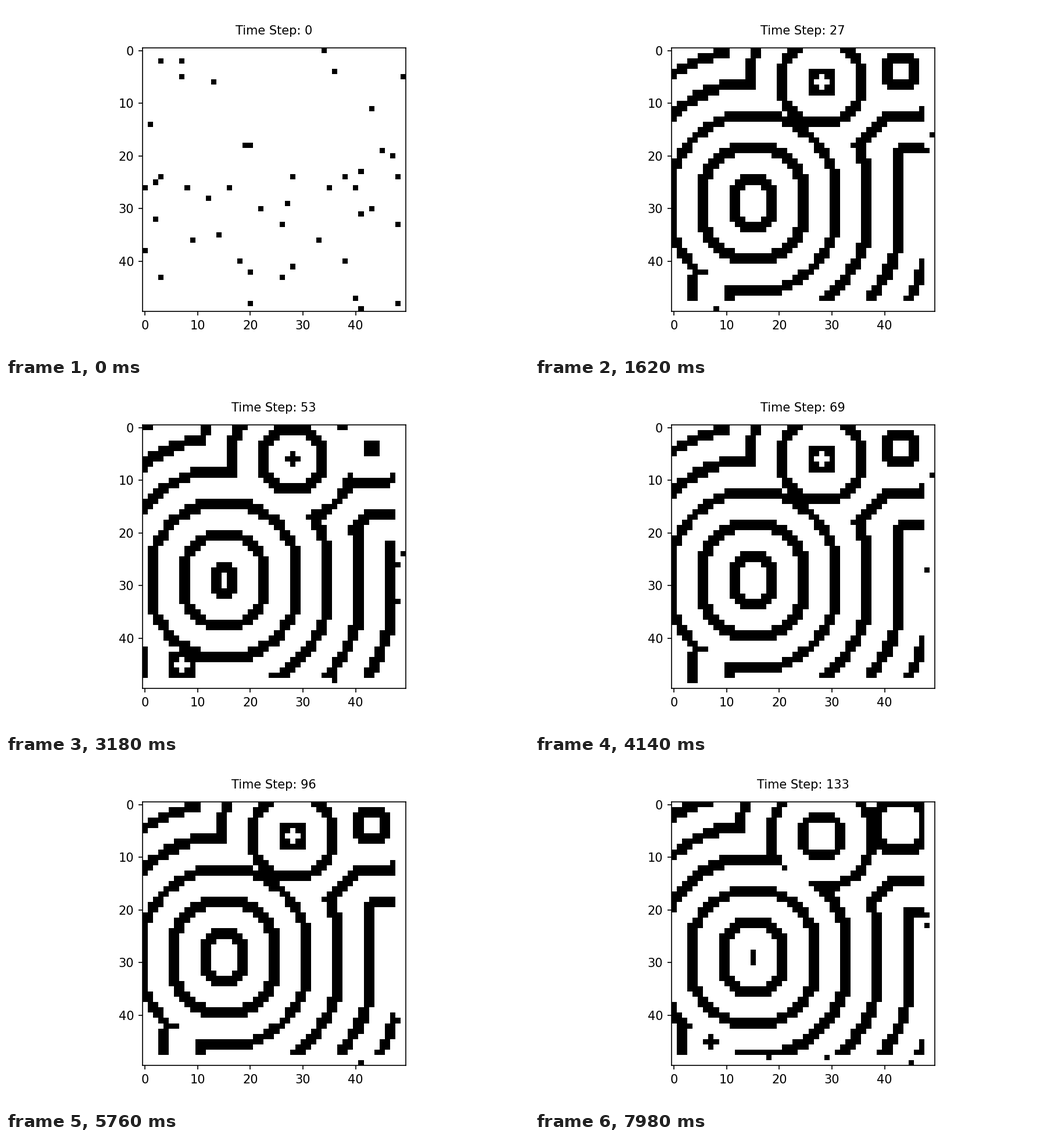
A matplotlib script for the animation above (8 s loop, 900x600 px).

```python
import numpy as np
import matplotlib.pyplot as plt
from matplotlib.animation import FuncAnimation

SIZE, LIVE = 50, 48          # the last two rows and columns only flicker
LOOP, TICK, HOLD = 8000, 20, 3
FRAMES = LOOP // TICK
STEPS = (FRAMES - 1) // HOLD + 1
PERIOD = 3                   # every cell reached by a wave refires after this
NOISE = 0.018

y, x = np.mgrid[:SIZE, :SIZE]


def broad_wave(cx, cy, start):
    """Arrival steps of a wave from a clump of cells, slightly flattened."""
    dx, dy = abs(x - cx), abs(y - cy)
    bow = 0.99 * np.hypot(dx + 0.8, dy)
    d = np.maximum(np.maximum(dx + 1, dy), bow)
    return start + d // 2


def point_wave(cx, cy, start, slow=1.03, lead=0.96):
    """Arrival steps of a round wave from one cell, two cells per step."""
    d = slow * np.hypot(x - cx, y - cy) + lead
    return start + d // 2


arrival = np.minimum.reduce([
    broad_wave(15, 29, 1),
    point_wave(28, 6, 5),
    point_wave(43, 4, 8, slow=1, lead=0),
    point_wave(7, 45, 7),
])
arrival[(x >= LIVE) | (y >= LIVE)] = STEPS


def firing(step):
    """Cells that fire: locked to a wave, or at random while still at rest."""
    age = step - arrival
    rng = np.random.default_rng(100 + step)
    spark = rng.random((SIZE, SIZE)) < NOISE
    return np.where(age >= 0, age % PERIOD == 0, spark)


states = [firing(step).astype(float) for step in range(STEPS)]

fig, ax = plt.subplots(figsize=(6, 4), dpi=150)
fig.subplots_adjust(left=0.125, right=0.9, bottom=0.125, top=0.88)
image = ax.imshow(states[0], cmap="binary", vmin=0, vmax=1,
                  interpolation="nearest")
label = ax.text(0.5, 1.05, "", transform=ax.transAxes,
                ha="center", fontsize=10)


def draw(frame):
    step = frame // HOLD
    image.set_data(states[step])
    label.set_text(f"Time Step: {step}")
    return image, label


anim = FuncAnimation(fig, draw, frames=FRAMES, interval=TICK,
                     repeat=True, repeat_delay=0, blit=False)
plt.show()
```
